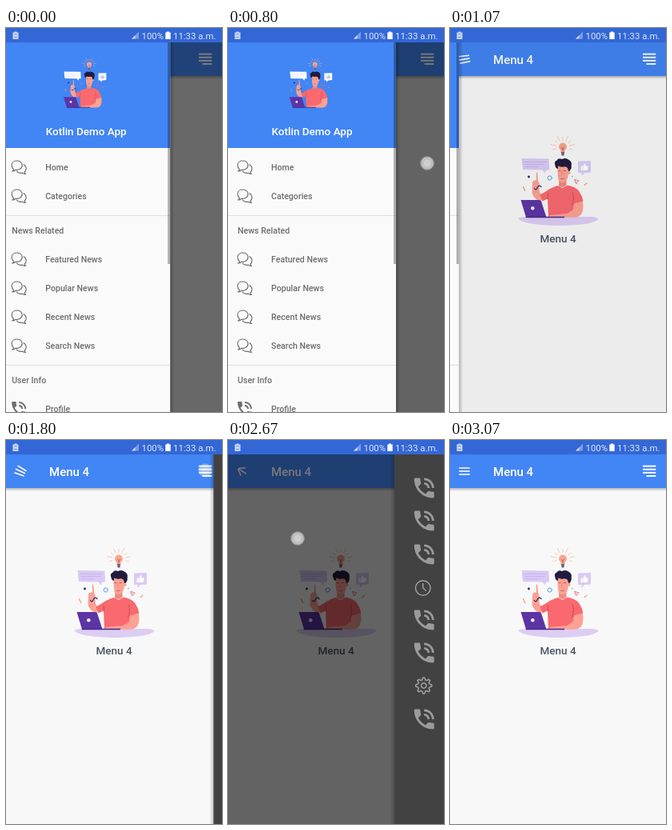
Write an HTML page with a canvas that moves like this. It is 270x480 px and loops after 3140 ms.

```html
<!DOCTYPE html>
<html lang="en">
<head>
<meta charset="utf-8">
<title>Two drawers</title>
<style>
html, body { margin: 0; width: 100%; height: 100%; overflow: hidden; background: #f8f8f8; }
canvas { display: block; width: 270px; height: 480px; }
</style>
</head>
<body>
<canvas id="stage"></canvas>
<script>
const W = 270, H = 480, LOOP = 3140, SETTLE = 436;
const LEFT_W = 210, RIGHT_W = 76;
const LEFT_CLOSE = 877, RIGHT_START = 1788, RIGHT_CLOSE = 2654;
const PAGE_LAG = 18, BAR_LAG = 38; // the scrim trails the drawers slightly
const BLUE = '#4285f4', GREY = '#6e6e6e';

const canvas = document.getElementById('stage');
const dpr = window.devicePixelRatio || 1;
canvas.width = W * dpr;
canvas.height = H * dpr;
const c = canvas.getContext('2d');

const clamp = x => Math.max(0, Math.min(1, x));
const lerp = (a, b, p) => a + (b - a) * p;
const ease = x => 1 - Math.pow(1 - clamp(x), 5);
const settle = (t, start) => ease((t - start) / SETTLE);

const leftOpen = t => t < LEFT_CLOSE ? settle(t, -230) : 1 - settle(t, LEFT_CLOSE);
const rightOpen = t => t < RIGHT_CLOSE ? settle(t, RIGHT_START) : 1 - settle(t, RIGHT_CLOSE);
const anyOpen = t => Math.max(leftOpen(t), rightOpen(t));

const TOUCHES = [
  { x: 249, y: 169, from: 600, to: 1000 },
  { x: 249, y: 38, from: 1670, to: 1870 },
  { x: 87, y: 123, from: 2400, to: 2780 }
];

const PHONE = new Path2D('M20 15.5c-1.25 0-2.45-.2-3.57-.57-.35-.11-.74-.03-1.02.24l-2.2 2.2' +
  'c-2.83-1.44-5.15-3.75-6.59-6.58l2.2-2.21c.28-.27.36-.66.25-1.01C8.7 6.45 8.5 5.25 8.5 4' +
  'c0-.55-.45-1-1-1H4c-.55 0-1 .45-1 1 0 9.39 7.61 17 17 17 .55 0 1-.45 1-1v-3.5c0-.55-.45-1-1-1z' +
  'M19 12h2c0-4.97-4.03-9-9-9v2c3.87 0 7 3.13 7 7zm-4 0h2c0-2.76-2.24-5-5-5v2c1.66 0 3 1.34 3 3z');

function rect(x, y, w, h, fill) {
  c.fillStyle = fill;
  c.fillRect(x, y, w, h);
}

function shape(d, fill) {
  c.fillStyle = fill;
  c.fill(new Path2D(d));
}

function line(d, color, width) {
  c.strokeStyle = color;
  c.lineWidth = width;
  c.stroke(new Path2D(d));
}

function disc(x, y, r, fill) {
  c.fillStyle = fill;
  c.beginPath();
  c.arc(x, y, r, 0, Math.PI * 2);
  c.fill();
}

function ring(x, y, r, color, width) {
  c.strokeStyle = color;
  c.lineWidth = width;
  c.beginPath();
  c.arc(x, y, r, 0, Math.PI * 2);
  c.stroke();
}

// y is the middle of the capitals
function text(s, x, y, size, color, weight = 500, align = 'left') {
  c.font = `${weight} ${size}px Roboto, sans-serif`;
  c.textAlign = align;
  c.fillStyle = color;
  c.fillText(s, x, y + size * 0.36);
}

function at(x, y, scale, draw) {
  c.save();
  c.translate(x, y);
  c.scale(scale, scale);
  draw();
  c.restore();
}

function fade(x0, y0, x1, y1, alpha) {
  const g = c.createLinearGradient(x0, y0, x1, y1);
  g.addColorStop(0, `rgba(0,0,0,${alpha})`);
  g.addColorStop(1, 'rgba(0,0,0,0)');
  return g;
}

function drawBulb() {
  for (let i = 0; i < 9; i++) {
    const a = Math.PI * (1 + (i - 0.5) / 7), r = i % 2 ? 15 : 12.5;
    const x = Math.cos(a), y = Math.sin(a);
    line(`M${141 + x * 8.5} ${149 + y * 8.5}L${141 + x * r} ${149 + y * r}`, '#f3bb98', 0.7);
  }
  disc(141, 148.5, 4.9, '#fba48c');
  shape('M138.500 152H143.500V156H138.500z', '#fba48c');
  line('M139.500 149L141 152L142.500 149M141 152V154', '#8a4a55', 0.6);
  shape('M139 155H143L142.500 159.500H139.500z', '#6a6280');
}

function drawConfetti() {
  line('M91.500 198.500L93.700 203.500', '#f59a6d', 1.2);
  line('M168 196.500L171 194', '#f59a6d', 1.1);
  line('M156 189.500L161 191L158 194.500z', '#f0616d', 0.9);
  disc(98.5, 186, 1.4, '#2b2350');
  disc(153, 185.5, 0.8, '#5b9bf0');
  ring(124.7, 187.5, 2.6, '#5b9bf0', 1);
}

function drawArt(bubble, marks) {
  c.lineCap = 'round';
  drawBulb();
  shape('M89.500 163L123.500 163.500L124 177.500H120L119 181.500L115.500 177.500L91 177z', bubble);
  line('M93 167.500H120M93.500 170.500H118M94 173.500H110', marks, 0.6);
  shape('M160 166.500L176 166V180.500L168 181L164.500 185V181H160z', bubble);
  shape('M163.500 172.500H165.700V178H163.500zM166.300 173L168.300 168.800Q170 169.500 169.300 172.200H172.500Q173 177 171 178H166.300z', bubble === '#fff' ? marks : '#fff');
  drawConfetti();
  // raised arm
  shape('M107.800 180.500Q109.300 180 109.500 182L110 191Q112.300 193 111.300 199L112 205L117 212L112 217Q104 212 102.500 206L103 193Q104.500 189.500 107.800 190.500z', '#fca193');
  line('M105.500 200.500Q107.500 203.500 109.300 199.500T114 198.500', '#3c2b6b', 1.3);
  // shirt
  shape('M112.500 208.500L121 203.500Q126 199.500 135 197L140.500 200L147 196.500Q157 198.500 161 203.500Q165.500 210 166.500 216.500L155 220.500L154.500 236H123L122 213.500L115.500 216.500z', '#f9696f');
  line('M122.300 207V214M153.500 206Q156 214 152.500 222', '#b5434e', 0.7);
  // neck, face and hair
  shape('M136.500 188H145.500V196.500Q141 201 136 197z', '#ee8981');
  shape('M134.500 173H147.800V183Q147 191 142.500 193.200Q138.500 194 136 190.500Q134.300 187 134.500 173z', '#fca193');
  disc(148.7, 181, 1.9, '#fca193');
  shape('M131.500 172Q129.500 167 133.500 165.500Q135.500 162 140 164Q144 161.800 148 164.500Q152.500 166.500 151.800 171Q152.500 175 150 178.500L148 179L147 175Q145 172.500 142 173.500Q138 174 135.300 172.500L134.800 176Q132 175.500 131.500 172z', '#211b3d');
  line('M136 178.500H138M142 178.500H144.500M138.500 188.500Q140.500 189.300 142.500 188', '#713f4c', 0.6);
  line('M139.700 180V184', '#df7468', 0.6);
  // resting arm
  shape('M155 219.500L166 216.500Q167.500 228 164 233Q161 236.700 155 236.700H123L125 234L146 232L154 227z', '#fca193');
  // laptop
  shape('M88.500 215H112Q113.500 215 114 216.500L120.500 236.500H95z', '#5c34a5');
  shape('M94.500 235.800H143V237.300H95z', '#46298c');
  disc(103.3, 225.3, 2.3, '#f1eafd');
  c.lineCap = 'butt';
}

function drawDesk() {
  shape('M85 238Q88 236 96 236H176Q184 236 185.500 238.500Q180 246.500 136 247Q92 246.500 85 238z', '#dccdf3');
}

function drawChat() {
  c.lineJoin = 'round';
  line('M-6.500 2.800Q-9 .5 -9 -2.500C-9 -9.800 4 -9.800 4 -2.500C4 2 -.5 3.800 -4 3.200Q-6 5 -8.500 5Q-6.700 4 -6.500 2.800z', GREY, 1.15);
  line('M5.500 -3.500Q9 -1.800 9 2Q9 4.500 6.800 6.200Q7 7.500 8.500 8.500Q6 8.500 4.300 7.200Q-1 8 -3 4.800', GREY, 1.15);
}

function phone(x, y, scale, fill) {
  at(x, y, scale, () => {
    c.translate(-12, -12);
    c.fillStyle = fill;
    c.fill(PHONE);
  });
}

function drawClock() {
  ring(0, 0, 9.3, '#a2a2a2', 1.4);
  line('M0 -6V0L4 3.500', '#a2a2a2', 1.4);
}

function drawGear() {
  c.strokeStyle = '#a2a2a2';
  c.lineWidth = 1.5;
  c.lineJoin = 'round';
  c.beginPath();
  for (let i = 0; i < 32; i++) {
    const a = (i - 1.5) * Math.PI / 16, r = i % 4 === 1 || i % 4 === 2 ? 10 : 7.3;
    c.lineTo(Math.cos(a) * r, Math.sin(a) * r);
  }
  c.closePath();
  c.stroke();
  ring(0, 0, 3.2, '#a2a2a2', 1.5);
}

// three bars that turn into a back arrow
function drawBurger(p, closing) {
  const head = lerp(13.5, 8.5, p), shaft = lerp(13.5, 12, p);
  const cut = lerp(0, 0.53, p), gap = lerp(4, -0.5, p), bend = p * Math.PI / 4;
  const dx = head * Math.cos(bend), dy = head * Math.sin(bend), edge = -shaft / 2;
  c.save();
  c.translate(18, 39);
  c.rotate(Math.PI * (p - 1) * (closing ? -1 : 1));
  line(`M${edge + cut} 0h${shaft - 2 * cut}M${edge} ${gap}l${dx} ${dy}M${edge} ${-gap}l${dx} ${-dy}`, '#fff', 1.6);
  c.restore();
}

function drawPage(p, closing) {
  rect(0, 0, W, H, '#f8f8f8');
  rect(0, 60, W, 4, fade(0, 60, 0, 64, 0.28));
  rect(0, 18, W, 42, BLUE);
  drawBurger(p, closing);
  text('Menu 4', 54, 39.5, 15, '#fff');
  [241, 241, 241, 245.5].forEach((x, i) => rect(x, 31.7 + i * 4.1, 257.3 - x, 1.9, '#fff'));
  drawDesk();
  drawArt('#d9caf4', '#bda8e8');
  text('Menu 4', 135, 263.5, 13.5, '#4b5563', 500, 'center');
}

function drawScrim(t) {
  rect(0, 18, W, 42, `rgba(0,0,0,${0.53 * anyOpen(t - BAR_LAG)})`);
  rect(0, 60, W, H - 60, `rgba(0,0,0,${0.6 * anyOpen(t - PAGE_LAG)})`);
}

function drawLeft(p) {
  if (p * LEFT_W < 0.3) return;
  c.save();
  c.translate((p - 1) * LEFT_W, 0);
  rect(LEFT_W, 18, 5, H, fade(LEFT_W, 0, LEFT_W + 5, 0, 0.25));
  rect(0, 18, LEFT_W, H, '#fafafa');
  rect(0, 18, LEFT_W, 132, BLUE);
  at(22.8, -45, 0.61, () => drawArt('#fff', '#c9c3ee'));
  text('Kotlin Demo App', 105, 129.5, 13.5, '#fff', 500, 'center');
  const rows = { Home: 174, Categories: 210, 'Featured News': 289, 'Popular News': 325, 'Recent News': 361, 'Search News': 397 };
  for (const name in rows) {
    at(21, rows[name], 1, drawChat);
    text(name, 54, rows[name] + 0.5, 10.6, GREY);
  }
  phone(21, 476, 1, GREY);
  text('Profile', 54, 476.5, 10.6, GREY);
  text('News Related', 12, 253.5, 10.6, GREY);
  text('User Info', 12, 440.5, 10.6, GREY);
  rect(0, 234, LEFT_W, 1, '#e0e0e0');
  rect(0, 421, LEFT_W, 1, '#e0e0e0');
  rect(LEFT_W - 3, 18, 3, 277, 'rgba(0,0,0,.3)');
  c.restore();
}

function drawRight(p) {
  if (p * RIGHT_W < 0.3) return;
  c.save();
  c.translate(W - p * RIGHT_W, 0);
  rect(-5, 18, 5, H, fade(0, 0, -5, 0, 0.2));
  rect(0, 18, RIGHT_W, H, '#424242');
  [60, 101, 143, 225, 266, 349].forEach(y => phone(37.5, y, 1.38, '#9b9b9b'));
  at(36, 185, 1, drawClock);
  at(37, 307, 1, drawGear);
  c.restore();
}

function drawStatus() {
  rect(0, 0, W, 18, '#3367d6');
  shape('M10.500 4.500H13.500V5.500H15.500V14H8.500V5.500H10.500z', '#c9d6f4');
  line('M10.300 8.500L12 7L13.700 8.500M10.300 11.500H13.700', '#5f86da', 0.9);
  shape('M157 13.500L166 4.500V13.500z', 'rgba(255,255,255,.35)');
  shape('M157 13.500L161.500 9V13.500z', '#c9d6f4');
  shape('M201 4.500H204V5.500H205.700V14H199.300V5.500H201z', '#fff');
  text('100%', 169.5, 9.5, 11.4, '#dfe7f9', 400);
  text('11:33 a.m.', 209, 9.5, 11.4, '#dfe7f9', 400);
}

function drawTouch(t) {
  for (const { x, y, from, to } of TOUCHES) {
    if (t < from || t >= to) continue;
    c.globalAlpha = clamp((to - t) / 110);
    disc(x, y, 9, 'rgba(255,255,255,.25)');
    disc(x, y, 7.8, 'rgba(235,235,235,.55)');
    disc(x, y, 4.5, 'rgba(255,255,255,.25)');
    c.globalAlpha = 1;
  }
}

function draw(t) {
  const closing = t > RIGHT_CLOSE || (t > LEFT_CLOSE && t < 1600);
  c.setTransform(dpr, 0, 0, dpr, 0, 0);
  drawPage(anyOpen(t), closing);
  drawScrim(t);
  drawLeft(leftOpen(t));
  drawRight(rightOpen(t));
  drawStatus();
  drawTouch(t);
}

const begin = performance.now();
function tick() {
  draw((performance.now() - begin) % LOOP);
  requestAnimationFrame(tick);
}
tick();
</script>
</body>
</html>
```
